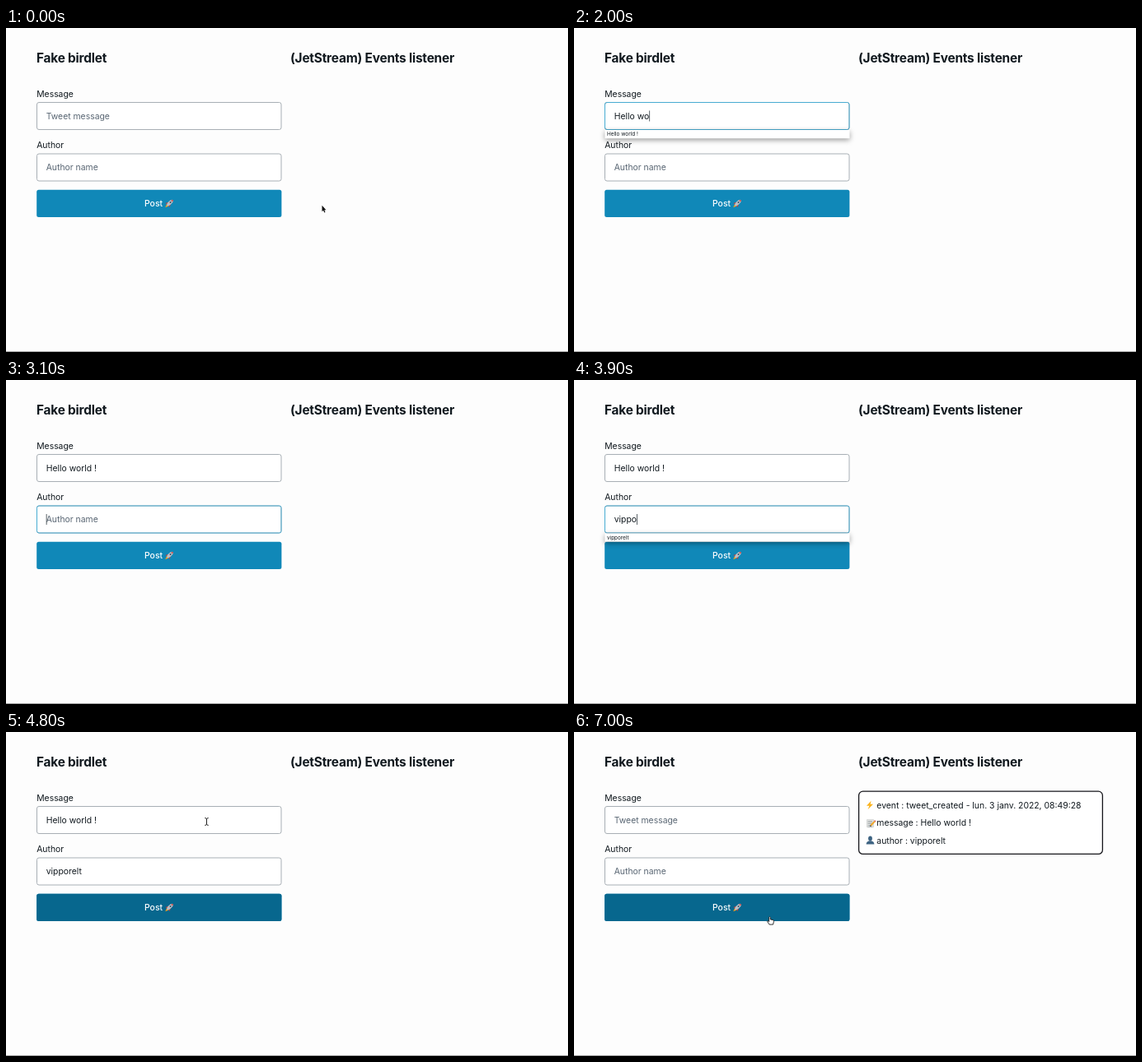
Animation, 682 px wide and 394 px high, one loop 8000 ms. Source, as an HTML page with a canvas:

```html
<!DOCTYPE html>
<html lang="en">
<head>
<meta charset="utf-8">
<title>Event form</title>
<style>
html, body { margin: 0; width: 100%; height: 100%; overflow: hidden; background: #fdfdfd; }
canvas { display: block; width: 682px; height: 394px; }
</style>
</head>
<body>
<canvas id="stage"></canvas>
<script>
const W = 682, H = 394, LOOP = 8000, STEP = 100;
const INK = '#11191f', HINT = '#596673', FONT = 'Inter, sans-serif';
const MESSAGE = 'Hello world !', AUTHOR = 'vipporelt';
const canvas = document.getElementById('stage');
const ctx = canvas.getContext('2d');
const ratio = window.devicePixelRatio || 1;
canvas.width = W * ratio;
canvas.height = H * ratio;

const clamp = v => Math.max(0, Math.min(1, v));
const ramp = (t, from, to) => clamp((t - from) / (to - from));
const between = (t, from, to) => t >= from && t < to;

function text(str, x, y, { size = 10.4, weight = 400, color = INK, spacing = 0 } = {}) {
  ctx.font = `${weight} ${size}px ${FONT}`;
  ctx.letterSpacing = spacing + 'px';
  ctx.fillStyle = color;
  ctx.fillText(str, x, y);
  return ctx.measureText(str).width;
}

function box(x, y, w, h, r, fill, stroke, line = 1) {
  ctx.beginPath();
  ctx.roundRect(x, y, w, h, r);
  if (fill) { ctx.fillStyle = fill; ctx.fill(); }
  if (stroke) { ctx.strokeStyle = stroke; ctx.lineWidth = line; ctx.stroke(); }
}

function faded(alpha, draw) {
  if (alpha <= 0) return;
  ctx.save();
  ctx.globalAlpha = alpha;
  draw();
  ctx.restore();
}

function shape(points, fill, stroke, line = 1) {
  ctx.beginPath();
  for (let i = 0; i < points.length; i += 2) ctx.lineTo(points[i], points[i + 1]);
  ctx.closePath();
  if (stroke) { ctx.strokeStyle = stroke; ctx.lineWidth = line; ctx.lineJoin = 'round'; ctx.stroke(); }
  if (fill) { ctx.fillStyle = fill; ctx.fill(); }
}

function at(x, y, draw, angle = 0) {
  ctx.save();
  ctx.translate(x, y);
  ctx.rotate(angle);
  draw();
  ctx.restore();
}

function oval(x, y, rx, ry, fill) {
  ctx.beginPath();
  ctx.ellipse(x, y, rx, ry, 0, 0, 7);
  ctx.fillStyle = fill;
  ctx.fill();
}

function field(y, value, hint, focus, caret) {
  box(37.5, y, 296.5, 33, 2.5, '#fff', '#a8afb5');
  faded(focus, () => box(37.5, y, 296.5, 33, 2.5, null, '#48acd2'));
  const width = text(value || hint, 48.7, y + 20.3, { color: value ? INK : HINT });
  faded(caret, () => {
    ctx.fillStyle = '#4a5359';
    ctx.fillRect(48.7 + (value ? width : 0), y + 10, 0.9, 13);
  });
}

function suggestion(y, str) {
  ctx.save();
  ctx.shadowColor = 'rgba(0,0,0,.4)';
  ctx.shadowBlur = 6 * ratio;
  ctx.shadowOffsetY = 2 * ratio;
  box(37.5, y, 297, 10.2, 0, '#fff');
  ctx.restore();
  text(str, 40, y + 7.2, { size: 6.4 });
}

function rocket() {
  shape([-1.6, 3, 0, 7, 1.6, 3], '#f6a21c');
  shape([-1.8, -0.5, -3.6, 3.2, -1, 2.6], '#d23a35');
  shape([1.8, -0.5, 3.6, 3.2, 1, 2.6], '#d23a35');
  oval(0, -1, 2.1, 4.8, '#b9c1c7');
  shape([-1.5, -4, 0, -6.2, 1.5, -4], '#d23a35');
  oval(0, -1.8, 1, 1, '#36546b');
}

function bolt() {
  shape([1.5, -5.2, -4, 0.8, -0.6, 0.8, -2.4, 5.2, 4, -1.3, 0.7, -1.3], '#fbb31c');
}

function memo() {
  box(-4.6, -4.6, 8.2, 9.4, 0.5, '#e3e4e2', '#b8bcbd', 0.5);
  ctx.fillStyle = '#8d969b';
  for (let y = -3; y < 4; y += 1.7) ctx.fillRect(-3.4, y, 5.4, 0.6);
  at(2.2, 0.6, () => {
    ctx.fillStyle = '#f0a72b';
    ctx.fillRect(-1, -4, 2, 7);
    ctx.fillStyle = '#d8656a';
    ctx.fillRect(-1, -5.2, 2, 1.3);
    shape([-1, 3, 1, 3, 0, 4.8], '#4a4038');
  }, 0.75);
}

function bust() {
  oval(0, -2, 2.4, 3, '#3d6382');
  ctx.beginPath();
  ctx.ellipse(0, 5, 4.9, 4.2, 0, Math.PI, 0);
  ctx.fill();
}

function eventCard() {
  box(345.6, 72.2, 295.8, 76.2, 5, '#fff', '#15151a', 1.3);
  at(359, 89, bolt);
  at(360, 111, memo);
  at(359.5, 131.5, bust);
  text('event : tweet_created - lun. 3 janv. 2022, 08:49:28', 367.3, 92.8);
  text('message : ' + MESSAGE, 367.3, 114.4);
  text('author : ' + AUTHOR, 367.3, 135.6);
}

function arrow() {
  shape([0, 0, 0, 7.6, 1.6, 6.1, 2.8, 8.8, 4, 8.3, 2.8, 5.7, 4.9, 5.5], '#111', '#fff', 1.2);
}

function beam() {
  const strokes = (color, line) => {
    ctx.beginPath();
    ctx.moveTo(-2.2, -4.4);
    ctx.quadraticCurveTo(0, -4.4, 0, -3.2);
    ctx.lineTo(0, 3.2);
    ctx.quadraticCurveTo(0, 4.4, -2.2, 4.4);
    ctx.moveTo(2.2, -4.4);
    ctx.quadraticCurveTo(0, -4.4, 0, -3.2);
    ctx.moveTo(0, 3.2);
    ctx.quadraticCurveTo(0, 4.4, 2.2, 4.4);
    ctx.strokeStyle = color;
    ctx.lineWidth = line;
    ctx.stroke();
  };
  strokes('#fff', 2);
  strokes('#222', 1);
}

function hand() {
  ctx.beginPath();
  ctx.moveTo(-1.8, 1.2);
  ctx.lineTo(-1.8, -4);
  ctx.quadraticCurveTo(-1, -5.4, -0.2, -4);
  ctx.lineTo(-0.2, -1.4);
  ctx.lineTo(2.8, -0.8);
  ctx.quadraticCurveTo(4.2, -0.4, 4, 1);
  ctx.lineTo(3.1, 4.8);
  ctx.lineTo(-1.4, 4.8);
  ctx.lineTo(-3.9, 1.2);
  ctx.quadraticCurveTo(-4, -0.5, -1.8, 1.2);
  ctx.closePath();
  ctx.fillStyle = '#fff';
  ctx.strokeStyle = '#1b1b1b';
  ctx.lineWidth = 0.9;
  ctx.fill();
  ctx.stroke();
}

function pointer(t) {
  if (t < 100) at(383.5, 215.7, arrow);
  else if (t < 200) at(187, 107, beam);
  else if (t < 1300) at(227.5, 103.3, beam);
  else if (t >= 4800) {
    const down = ramp(t, 4800, 5300), aside = ramp(t, 5900, 6100);
    const ease = down * down * (3 - 2 * down);
    const x = 243.5 - 44.5 * ease + 39.5 * aside;
    const y = 109 + 110 * ease + 10.3 * aside;
    if (y > 197) at(x, y, hand);
    else if (between(y, 124, 153) || y > 186) at(x, y - 4, arrow);
    else at(x, y, beam);
  }
}

function typedMessage(t) {
  if (t < 1300 || t >= 5500) return '';
  const count = t < 2500 ? Math.min(11, Math.floor((t - 1200) / 100)) : t < 2700 ? 12 : 13;
  return MESSAGE.slice(0, count);
}

function typedAuthor(t) {
  return between(t, 3500, 5500) ? AUTHOR.slice(0, Math.floor((t - 3400) / 100)) : '';
}

function draw(t) {
  ctx.setTransform(ratio, 0, 0, ratio, 0, 0);
  ctx.fillStyle = '#fdfdfd';
  ctx.fillRect(0, 0, W, H);
  ctx.fillStyle = '#a6a6a6';
  ctx.fillRect(0, 393, W, 1);

  const title = { size: 15.4, weight: 700, spacing: -0.2 };
  text('Fake birdlet', 37, 41.8, title);
  text('(JetStream) Events listener', 345, 41.8, title);
  text('Message', 37.2, 83.6);

  const messageFocus = ramp(t, 400, 700) - ramp(t, 2900, 3100);
  const authorFocus = ramp(t, 2900, 3100) - ramp(t, 4500, 4700);
  const messageCaret = between(t, 500, 1300) ? 1 - ramp(t, 800, 1100) : +between(t, 1300, 2900);
  field(90.5, typedMessage(t), 'Tweet message', messageFocus, messageCaret);
  text('Author', 37.2, 146);
  field(153, typedAuthor(t), 'Author name', authorFocus, +between(t, 2900, 4600));

  box(37.2, 196.8, 297.2, 33.2, 2.5, '#1088b8');
  faded(ramp(t, 4500, 4800), () => box(37.2, 196.8, 297.2, 33.2, 2.5, '#07678e'));
  text('Post', 168, 217.1, { color: '#fff', weight: 500 });
  at(198.3, 213.3, rocket, 0.8);

  if (between(t, 1300, 2700)) suggestion(124, MESSAGE);
  if (between(t, 3500, 4600)) suggestion(186.4, AUTHOR);
  if (t >= 6400) eventCard();
  pointer(t);
}

function frame(now) {
  draw(Math.floor((now % LOOP) / STEP) * STEP);
  requestAnimationFrame(frame);
}
requestAnimationFrame(frame);
</script>
</body>
</html>
```
